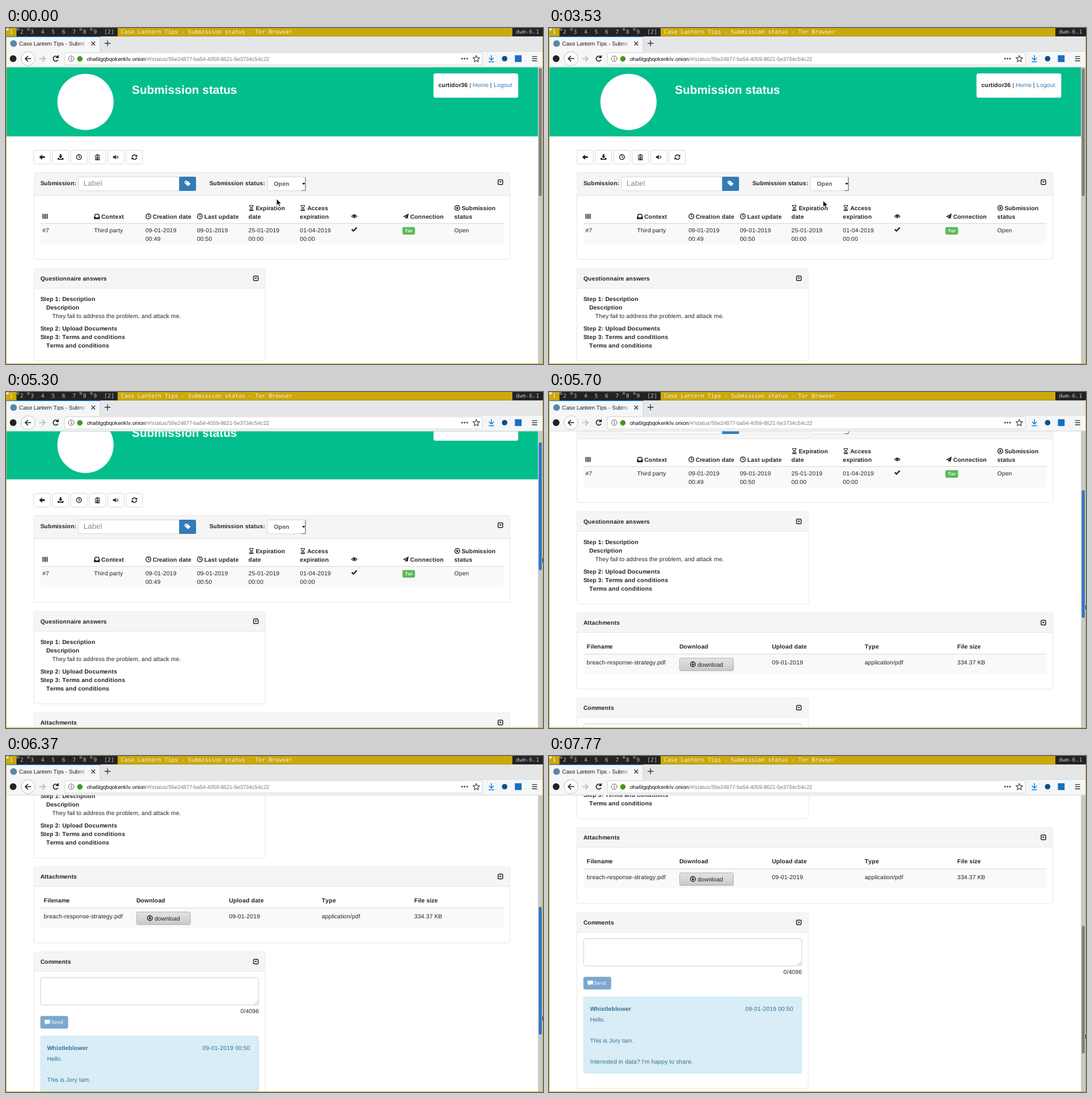
Animation, 947 px wide and 592 px high, one loop 8 s. Source, as an HTML page:

```html
<!DOCTYPE html>
<html lang="en">
<head>
<meta charset="utf-8">
<title>Submission status</title>
<style>
html, body { margin: 0; width: 100%; height: 100%; overflow: hidden; background: #fff; }
svg { display: block; width: 947px; height: 592px; }
text { font: 14px "Liberation Sans", Arial, sans-serif; fill: #222; text-rendering: geometricPrecision; white-space: pre; }
.b { font-weight: bold; }
.h1 { font-size: 28px; font-weight: bold; fill: #fff; }
.mono { font: 13.29px "DejaVu Sans Mono", monospace; fill: #bbb; }
.lit { fill: #f2f2e6; }
.tab { font-size: 13.4px; }
.url { font-size: 13px; fill: #0c0c0d; }
.link { fill: #337ab7; }
.hint { font-size: 17.5px; fill: #888; }
.note { fill: #31708f; }
.send { font-size: 12px; fill: #fff; }
.end { text-anchor: end; }
.i { fill: currentColor; }
.l { fill: none; stroke: currentColor; stroke-width: 2; }
</style>
</head>
<body>
<svg id="stage" viewBox="0 0 1280 800" preserveAspectRatio="none"></svg>
<script>
const GOLD = '#cba80c', INK = '#222', LINE = '#ddd';

// Icons live in a 14 x 14 box
const ICONS = {
  back: '<path d="M0 7 7 .8V5h6.5v4H7v4.2z"/>',
  save: '<path d="M5.2 0h3.6v4.5h3.2L7 9.5 2 4.5h3.2zM0 9h3l2 2h4l2-2h3v4.5H0z"/>',
  clock: '<circle class="l" cx="7" cy="7" r="5.8"/><path class="l" style="stroke-width:1.6" d="M7 3v4l2.8 1.5"/>',
  trash: '<path class="l" style="stroke-width:1.4" d="M.5 3h13M5 3V1h4v2M2.2 4.5v9h9.6v-9M5 5v8M7 5v8M9 5v8"/>',
  sound: '<path d="M0 5h3l4-3.5v11L3 9H0z"/><path class="l" style="stroke-width:1.3" d="M8.8 4.5q2 2.5 0 5M10.7 3q3.2 4 0 8"/>',
  reload: '<path class="l" d="M1.5 6.5A5.5 5.5 0 0 1 11.5 4M12.5 7.5A5.5 5.5 0 0 1 2.5 10"/><path d="M13.8.5v5.5H8.5zM.2 13.5V8h5.3z"/>',
  tag: '<path fill-rule="evenodd" d="M0 1h6.5L14 8l-5.8 5.8L0 7zM3 2.8a1.3 1.3 0 1 0 .1 0z"/>',
  bars: '<path class="l" d="M1 1v12M4.5 1v12M8 1v12M11.5 1v12"/>',
  tray: '<path fill-rule="evenodd" d="M2.5 1h9L14 8v5.5H0V8zM4 3 2.3 8H4.5l1 2h3l1-2h2.2L10 3z"/>',
  glass: '<path class="l" style="stroke-width:1.5" d="M2 .8h10M2 13.2h10M3.3 1v2.5L6.5 7 3.3 10.5V13M10.7 1v2.5L7.5 7l3.2 3.5V13"/><path d="M4.5 12.5 7 9.5l2.5 3z"/>',
  eye: '<path class="l" style="stroke-width:1.5" d="M.5 7Q7-1 13.5 7 7 14 .5 7z"/><circle cx="7" cy="6.5" r="3"/>',
  check: '<path d="M0 7.5 2.3 5.2 5 8l6.5-7L14 3.3 5 12.5z"/>',
  plane: '<path d="M14 0 11.5 12.5 7.5 10.5 5.5 14V9.5L11 3.5 4 9 0 7.5z"/>',
  record: '<circle class="l" cx="7" cy="7" r="5.8"/><circle cx="7" cy="7" r="2.5"/>',
  down: '<circle class="l" cx="7" cy="7" r="5.8"/><path d="M5.7 3h2.6v4h2.3L7 11 3.4 7h2.3z"/>',
  fold: '<rect class="l" x="1.5" y="1.5" width="11" height="11" rx="2"/><path d="M3.8 5.2h6.4L7 9z"/>',
  talk: '<path d="M0 1h13v9H6.5L3 13.5V10H0z"/>'
};

const icon = (name, x, y, color = INK) =>
  `<g class="i" transform="translate(${x} ${y})" style="color:${color}">${ICONS[name]}</g>`;
const text = (x, y, s, cls = '') => `<text x="${x}" y="${y}" class="${cls}">${s}</text>`;
const bold = (x, y, s) => text(x, y, s, 'b');
const rect = (x, y, w, h, fill, more = '') =>
  `<rect x="${x}" y="${y}" width="${w}" height="${h}" fill="${fill}" ${more}/>`;
const box = (x, y, w, h, fill, line, r = 4) =>
  rect(x + .5, y + .5, w - 1, h - 1, fill, `stroke="${line}" rx="${r}"`);
const path = (d, color, w, more = '') =>
  `<path d="${d}" fill="none" stroke="${color}" stroke-width="${w}" ${more}/>`;
const dot = (x, y, r, fill) => `<circle cx="${x}" cy="${y}" r="${r}" fill="${fill}"/>`;

function panel(y, w, h, head, title) {
  return box(66, y, w, h, '#fff', LINE) +
    rect(67, y + 1, w - 2, head - 1, '#f5f5f5', 'rx="3"') +
    rect(67, y + head, w - 2, 1, LINE) +
    (title ? bold(82, y + 28.5, title) : '') +
    icon('fold', 66 + w - 30, y + 16.5);
}

const tableRow = (y, h) => rect(82, y - 2, 1104, 2, LINE) + rect(82, y, 1104, h, '#f9f9f9');

function header() {
  return rect(1, 93, 1267, 165, '#02be8c') + dot(189.5, 176, 67, '#fff') +
    text(300, 157, 'Submission status', 'h1') +
    rect(1019, 108, 202, 58, '#fff', 'rx="5"') +
    text(1100.5, 140.5, 'curtidor36', 'b end') + text(1105, 140.5, '|') +
    text(1112.5, 140.5, 'Home', 'link') + text(1154, 140.5, '|') +
    text(1162.5, 140.5, 'Logout', 'link');
}

function tools() {
  return ['back', 'save', 'clock', 'trash', 'sound', 'reload'].map((n, i) =>
    box(66 + 44 * i, 290.5, 40, 34, '#fff', '#ccc') + icon(n, 79 + 44 * i, 300.5)).join('');
}

function status() {
  const col = i => 87 + 122.7 * i;
  const heads = [['bars'], ['tray', 'Context'], ['clock', 'Creation date'], ['clock', 'Last update'],
    ['glass', 'Expiration', 'date'], ['glass', 'Access', 'expiration'], ['eye'],
    ['plane', 'Connection'], ['record', 'Submission', 'status']];
  const cells = [['#7'], ['Third party'], ['09-01-2019', '00:49'], ['09-01-2019', '00:50'],
    ['25-01-2019', '00:00'], ['01-04-2019', '00:00'], [], [], ['Open']];
  return panel(343.5, 1135.5, 208, 55) +
    bold(82, 374.5, 'Submission:') +
    box(172, 354, 242, 34, '#fff', '#ccc') + text(185, 376, 'Label', 'hint') +
    rect(413, 354, 40, 34, '#337ab7', 'rx="4"') + rect(413, 354, 6, 34, '#337ab7') +
    icon('tag', 426, 363, '#fff') +
    bold(485, 374.5, 'Submission status:') +
    box(622, 354, 93, 34, '#fff', '#ccc') +
    `<text x="638.5" y="376" class="b" style="fill:#555">Open</text>` +
    path('M704 387H713.5V355', '#777', 1.6) + `<path d="M706 369h7l-3.5 4.5z"/>` +
    heads.map(([n, a, b], i) => {
      const y = b ? 434 : 454;
      return icon(n, col(i), y - 12.5) + (a ? bold(col(i) + 17.5, y, a) : '') +
        (b ? bold(col(i), 454, b) : '');
    }).join('') +
    tableRow(466.5, 48.5) +
    cells.map((c, i) => c.map((s, k) => text(col(i), 487 + 20 * k, s)).join('')).join('') +
    icon('check', col(6), 473) +
    rect(945, 474, 30, 18, '#5cb85c', 'rx="3"') +
    `<text x="951" y="487" class="b" style="font-size:11px;fill:#fff">Tor</text>`;
}

function answers() {
  return panel(572.5, 552.5, 220.5, 46.5, 'Questionnaire answers') +
    bold(82, 650, 'Step 1: Description') + bold(96, 670, 'Description') +
    text(110, 690, 'They fail to address the problem, and attack me.') +
    bold(82, 720.5, 'Step 2: Upload Documents') +
    bold(82, 740.5, 'Step 3: Terms and conditions') + bold(96, 760.5, 'Terms and conditions');
}

function files() {
  const col = i => 90 + 220.8 * i;
  const heads = ['Filename', 'Download', 'Upload date', 'Type', 'File size'];
  const cells = ['breach-response-strategy.pdf', '', '09-01-2019', 'application/pdf', '334.37 KB'];
  return panel(813.5, 1135.5, 182, 46.5, 'Attachments') +
    heads.map((s, i) => bold(col(i), 899, s)).join('') + tableRow(913, 46) +
    cells.map((s, i) => text(col(i), 936.5, s)).join('') +
    box(311, 921, 129, 31, 'url(#btn)', '#999', 3) +
    icon('down', 336, 929) + text(354, 941.5, 'download');
}

function comments() {
  const said = [['Hello.', 1275], ['This is Jory tam.', 1325.5],
    ["Interested in data? I'm happy to share.", 1375.5]];
  return panel(1016, 552.5, 419, 46, 'Comments') +
    box(82, 1077.5, 521, 66, '#fff', '#bbb') + path('M593 1141l8-8M597 1141l4-4', '#999', 1) +
    text(603, 1162.5, '0/4096', 'end') +
    box(82, 1169, 66, 30, '#7ba7d0', '#77a0c7', 3) + icon('talk', 92, 1177, '#fff') +
    text(107.5, 1188, 'Send', 'send') +
    box(82, 1216, 521, 183, '#d9edf7', '#bce8f1') +
    text(98, 1250, 'Whistleblower', 'note b') + text(582, 1250, '09-01-2019 00:50', 'note end') +
    said.map(([s, y]) => text(98, y, s, 'note')).join('');
}

function desktopBar() {
  let s = rect(0, 0, 1280, 20, '#222') + rect(0, 0, 25, 20, GOLD) + rect(266, 0, 941, 20, GOLD);
  for (let i = 0; i < 9; i++) s += text(8.5 + 25 * i, 14, i + 1, i ? 'mono' : 'mono lit');
  s += rect(1, 1, 5, 5, '#f2f2e6');
  for (const i of [1, 2, 7, 8]) s += rect(25 * i + 1.5, 1.5, 4, 4, 'none', 'stroke="#bbb"');
  return s + text(234, 14, '[2]', 'mono') +
    text(274, 14, 'Case Lantern Tips - Submission status - Tor Browser', 'mono lit') +
    text(1215, 14, 'dwm-6.1', 'mono');
}

function browser() {
  return rect(1, 19, 1278, 37, '#e5e6e8') + rect(1, 56, 1278, 37, '#f5f6f7') +
    rect(1, 19, 224, 37, '#f5f6f7') + rect(1, 19, 224, 2.5, '#0a84ff') +
    rect(224, 21, 1, 35, '#bbb') + rect(225, 55, 1054, 1, '#ccc') + rect(1, 92.5, 1278, 1, '#c8c8c8') +
    dot(18, 37, 8, '#5b86a8') + text(31, 42, 'Case Lantern Tips - Submi', 'tab') +
    rect(170, 25, 30, 28, 'url(#fade)') +
    path('M203.5 32.5l9 9m0-9l-9 9', '#333', 1.8) + path('M235 36.5h14m-7-7v14', '#333', 1.8) +
    dot(17, 73, 8, '#222') +
    `<circle cx="52.5" cy="73" r="16.5" fill="#fff" stroke="#aaa"/>` +
    path('M60 73H46m6.5-6.5L46 73l6.5 6.5', '#222', 2.2) +
    path('M79 73h14m-6.5-6.5L93 73l-6.5 6.5', '#b5b5b6', 2.2) +
    path('M124 75.5a6 6 0 1 1-2-7.5', '#222', 2.2) + `<path d="M125.5 64v7.5H118z" fill="#222"/>` +
    box(139, 58.5, 997, 30, '#fff', '#c4c4c4', 3) +
    `<circle cx="155.5" cy="73" r="6.5" fill="none" stroke="#555" stroke-width="1.3"/>` +
    path('M155.5 72v4.5M155.5 69v1.7', '#555', 1.7) +
    dot(176, 73.5, 6.5, '#3f9a14') +
    `<text x="192.5" y="78" class="url">oha6tgqbqokenklv.onion<tspan fill="#7b7b7d">/#/status/55e24877-ba54-4059-8621-5e3734c54c22</tspan></text>` +
    [1087, 1093, 1099].map(x => dot(x, 73, 2, '#444')).join('') +
    path('M1121 65.5l2.3 5 5.4.6-4 3.7 1.1 5.4-4.8-2.7-4.8 2.7 1.1-5.4-4-3.7 5.4-.6z', '#333', 1.5) +
    path('M1157 65v11.5m-5.5-5.5l5.5 5.5 5.5-5.5M1150.5 80.5h13', '#0a7cf0', 2) +
    dot(1188.5, 73, 6.5, '#0d4f86') + rect(1213, 65, 16, 16, '#1670c0', 'rx="1"') +
    path('M1254 68h12M1254 73h12M1254 78h12', '#333', 1.8);
}

const stage = document.getElementById('stage');
stage.innerHTML = `<defs>
  <clipPath id="view"><rect x="1" y="93.5" width="1267" height="705.5"/></clipPath>
  <linearGradient id="fade"><stop stop-color="#f5f6f7" stop-opacity="0"/><stop offset="1" stop-color="#f5f6f7"/></linearGradient>
  <linearGradient id="btn" x2="0" y2="1"><stop stop-color="#e4e4e4"/><stop offset="1" stop-color="#c9c9c9"/></linearGradient>
  </defs>` + rect(0, 0, 1280, 800, '#fff') +
  `<g clip-path="url(#view)"><g id="page">${header() + tools() + status() + answers() + files() + comments()}</g></g>` +
  rect(1268, 93.5, 11, 705.5, '#c9c9c9') + rect(1270, 96, 7, 304, '#7d7f80', 'rx="3.5" id="thumb"') +
  browser() + desktopBar() +
  path('M.5 19V799.5H1279.5V19', GOLD, 1.3) +
  `<path id="cursor" d="M0 1v15l3.5-3.2 2.6 6 2.6-1.1-2.600-5.8h4.9z" fill="#000" stroke="#fff" stroke-width="1"/>`;

// Hinted type: every glyph advances by whole pixels of the 1280 x 800 screen
const pen = document.createElement('canvas').getContext('2d');
function snapText(el) {
  const css = getComputedStyle(el);
  pen.font = `${css.fontWeight} ${css.fontSize} ${css.fontFamily}`;
  const steps = [...el.textContent].map(c => Math.round(pen.measureText(c).width));
  let x = +el.getAttribute('x');
  if (css.textAnchor === 'end') x -= steps.reduce((a, b) => a + b, 0);
  el.style.textAnchor = 'start';
  el.setAttribute('x', steps.map(w => (x += w) - w).join(' '));
}
stage.querySelectorAll('text').forEach(snapText);

// Monotone cubic curve through [time, value] points
function curve(keys) {
  const n = keys.length - 1;
  const d = keys.slice(1).map((k, i) => (k[1] - keys[i][1]) / (k[0] - keys[i][0]));
  const m = keys.map((k, i) =>
    i && i < n && d[i - 1] * d[i] > 0 ? 2 * d[i - 1] * d[i] / (d[i - 1] + d[i]) : 0);
  return t => {
    if (t <= keys[0][0]) return keys[0][1];
    if (t >= keys[n][0]) return keys[n][1];
    const i = keys.findIndex(k => k[0] > t) - 1;
    const [t0, a] = keys[i], [t1, b] = keys[i + 1], h = t1 - t0, u = (t - t0) / h, v = 1 - u;
    return a * v * v * (1 + 2 * u) + b * u * u * (3 - 2 * u) + h * u * v * (m[i] * v - m[i + 1] * u);
  };
}

const scroll = curve([[4900, 0], [5300, 50], [5700, 287], [6070, 458], [6730, 619], [7170, 643.4]]);
const cursorX = curve([[3490, 645], [3530, 653], [3750, 990], [3970, 1284]]);
const cursorY = curve([[3490, 406], [3530, 410], [3720, 434], [3970, 376]]);
const dragY = curve([[4880, 353], [5300, 392], [5700, 504], [6070, 573], [6730, 650], [7170, 659.5]]);

const [page, thumb, cursor] = ['page', 'thumb', 'cursor'].map(id => document.getElementById(id));

function draw(t) {
  const s = scroll(t), held = t >= 4230;
  const hover = t >= 3930 && t < 3970 || t >= 4370 && t < 4400;
  const x = held ? 1278 : cursorX(t), y = held ? dragY(t) : cursorY(t);
  page.setAttribute('transform', `translate(0 ${-Math.round(s * .74) / .74})`);
  thumb.setAttribute('y', 96 + s * .479);
  thumb.setAttribute('fill', hover ? '#5f6162' : t >= 4400 && t < 7770 ? '#2a76c6' : '#7d7f80');
  cursor.setAttribute('transform', `translate(${x} ${y})`);
}

const start = performance.now();
function tick() {
  draw((performance.now() - start) % 8000);
  requestAnimationFrame(tick);
}
tick();
</script>
</body>
</html>
```
